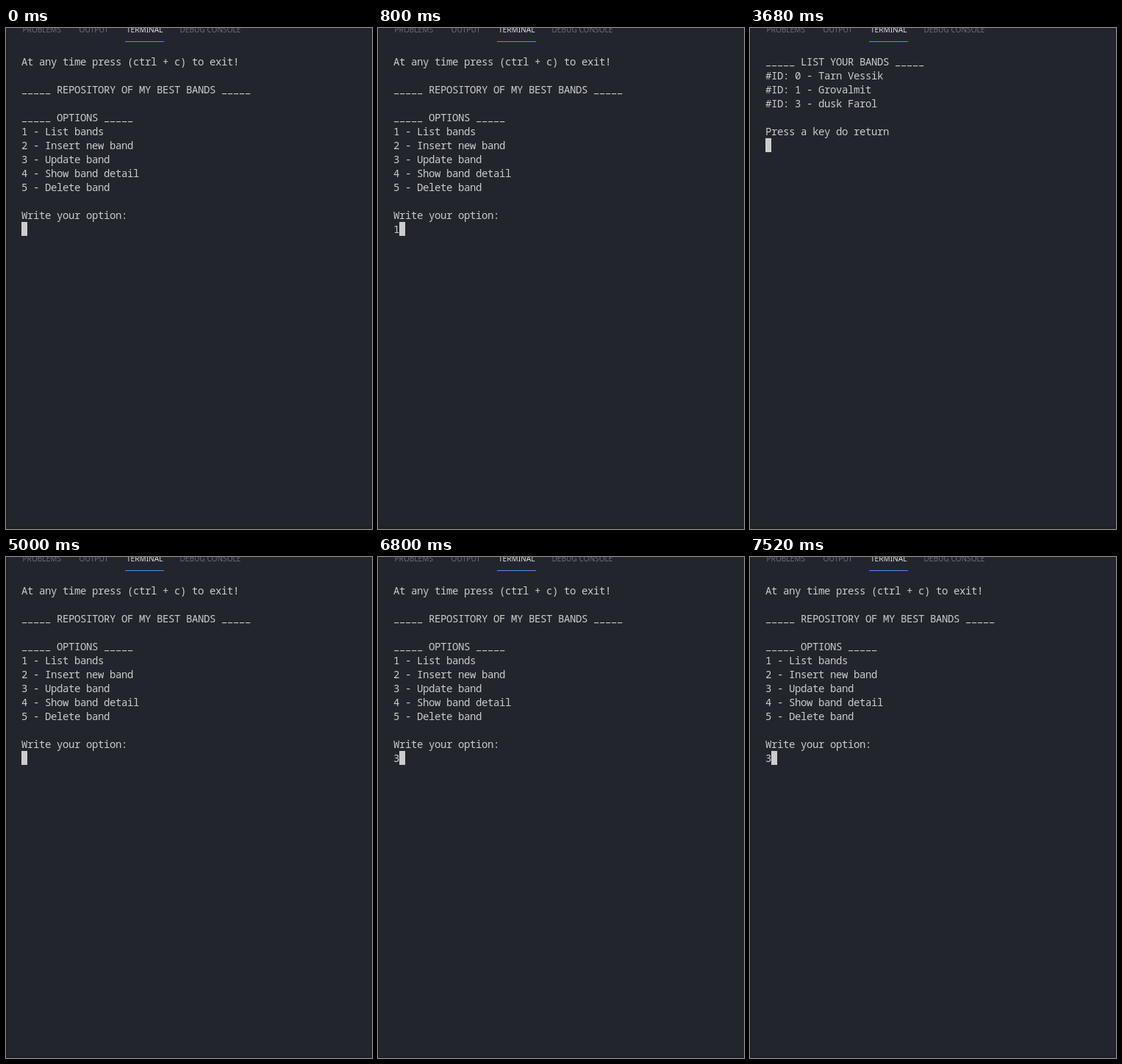
Recreate the animation shown at these times as an HTML page. Size 498 by 682 pixels, loop 8 s.

```html
<!DOCTYPE html>
<html lang="en">
<head>
<meta charset="utf-8">
<title>Band terminal</title>
<style>
  html, body { margin: 0; width: 100%; height: 100%; overflow: hidden; background: #22252c; }
  svg { display: block; width: 498px; height: 682px; }
  text { white-space: pre; }

  .tabs { font: 10.1px "Noto Sans", "Open Sans", sans-serif; fill: #6a6f79; }
  .tabs .active { fill: #dcdee2; }

  /* 14px glyphs on an 8px cell grid */
  .term { font: 14px "Roboto Mono", "Noto Sans Mono", monospace; letter-spacing: -.4px; fill: #ccc; }
  .term .rule { font-family: Roboto, sans-serif; letter-spacing: 1.68px; }

  .menu, .list, .one, .three, .cursor { animation: 8s step-end infinite; }
  .menu { animation-name: menu; }
  .list { animation-name: list; }
  .one { animation-name: one; }
  .three { animation-name: three; }
  .cursor { animation-name: cursor; fill: #ccc; }

  @keyframes menu {
    0%, 62.5%, 100% { visibility: visible; }
    21.25% { visibility: hidden; }
  }
  @keyframes list {
    0%, 62.5%, 100% { visibility: hidden; }
    21.25% { visibility: visible; }
  }
  @keyframes one {
    0%, 21.25%, 100% { visibility: hidden; }
    10% { visibility: visible; }
  }
  @keyframes three {
    0% { visibility: hidden; }
    85%, 100% { visibility: visible; }
  }
  @keyframes cursor {
    0%, 62.5% { transform: translate(21px, 264px); }
    10%, 85%, 100% { transform: translate(29px, 264px); }
    21.25% { transform: translate(21px, 150px); }
  }
</style>
</head>
<body>
<svg viewBox="0 0 498 682">
  <rect width="498" height="682" fill="#22252c"/>
  <rect width="1" height="682" fill="#1a1c22"/>
  <rect y="679" width="498" height="3" fill="#1e2026"/>

  <g class="tabs">
    <text x="22.5" y="6">PROBLEMS</text>
    <text x="99.5" y="6">OUTPUT</text>
    <text x="164" y="6" class="active">TERMINAL</text>
    <text x="236.5" y="6">DEBUG CONSOLE</text>
  </g>
  <rect x="162" y="18" width="53" height="1" fill="#528bff"/>

  <g class="term">
    <g class="menu">
      <text x="21" y="51">At any time press (ctrl + c) to exit!</text>
      <text x="22" y="89" class="rule">_____</text>
      <text x="69" y="89">REPOSITORY OF MY BEST BANDS</text>
      <text x="294" y="89" class="rule">_____</text>
      <text x="22" y="127" class="rule">_____</text>
      <text x="69" y="127">OPTIONS</text>
      <text x="134" y="127" class="rule">_____</text>
      <text x="21" y="146">1 - List bands</text>
      <text x="21" y="165">2 - Insert new band</text>
      <text x="21" y="184">3 - Update band</text>
      <text x="21" y="203">4 - Show band detail</text>
      <text x="21" y="222">5 - Delete band</text>
      <text x="21" y="260">Write your option:</text>
    </g>
    <text x="21" y="279" class="one">1</text>
    <text x="21" y="279" class="three">3</text>

    <g class="list">
      <text x="22" y="51" class="rule">_____</text>
      <text x="69" y="51">LIST YOUR BANDS</text>
      <text x="198" y="51" class="rule">_____</text>
      <text x="21" y="70">#ID: 0 - Tarn Vessik</text>
      <text x="21" y="89">#ID: 1 - Grovalmit</text>
      <text x="21" y="108">#ID: 3 - dusk Farol</text>
      <text x="21" y="146">Press a key do return</text>
    </g>
  </g>
  <rect class="cursor" width="8" height="19"/>
</svg>
</body>
</html>
```
